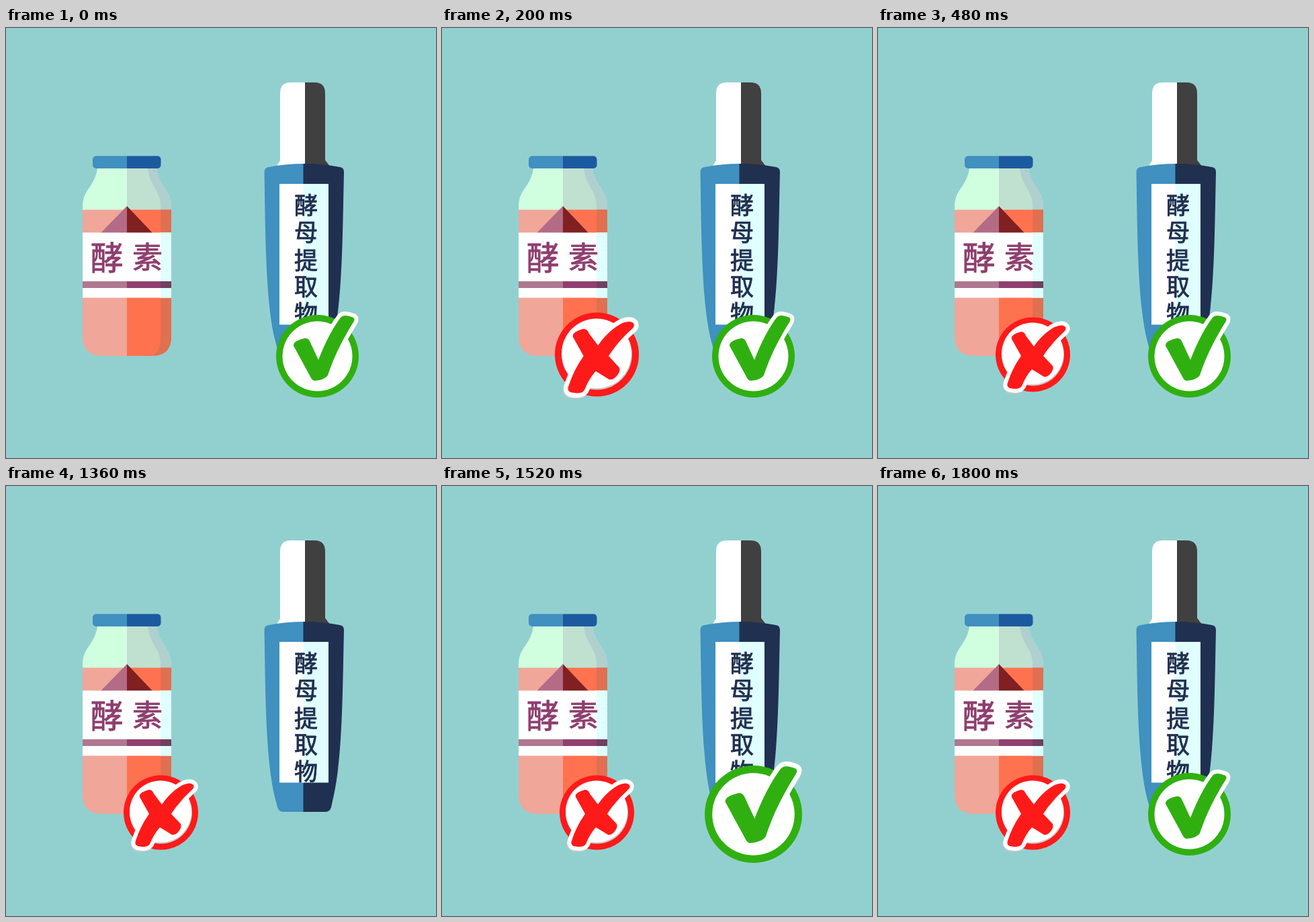
An HTML page for the animation above (2.8 s loop, 640 by 640 pixels).

```html
<!DOCTYPE html>
<html lang="zh">
<head>
<meta charset="utf-8">
<style>
  html, body { margin: 0; width: 100%; height: 100%; overflow: hidden; background: #92d0d0; }
  svg { display: block; width: 100%; height: 100%; }
  text { font: 500 35px "Noto Sans CJK SC", "Noto Sans CJK", sans-serif; text-anchor: middle; stroke-width: 0.9; }
  .outline { fill: #fff; stroke: #fff; stroke-width: 12; stroke-linejoin: round; }
</style>
</head>
<body>
<svg viewBox="0 0 640 640">
  <defs>
    <clipPath id="jar">
      <path d="M136 209C132 237 114 240 114 266V459Q114 488 143 488H217Q246 488 246 459V266C246 240 228 237 224 209Z"/>
    </clipPath>
    <clipPath id="lid"><rect x="129" y="190.500" width="101.500" height="18.500" rx="5"/></clipPath>
    <clipPath id="cap"><path d="M408 97Q408 81 424 81H459Q475 81 475 97V206H408Z"/></clipPath>
    <clipPath id="flask">
      <path d="M384.500 214Q384.500 208 391 207Q443 197 497 207Q503 208 503 214C501 300 501 395 489 455L484 478Q482 485 476 485H412Q406 485 404 478L400 463C386 405 386 300 384.500 214Z"/>
    </clipPath>
    <path id="tick" d="M428 473Q427 466 444 462Q449 461 452 466L465 494Q480 455 498 431Q503 425 517 431Q520 433 517 438Q491 479 479 517Q474 524 459 525Q455 524 453 519Z"/>
    <path id="ex" d="M199 463Q197 456 213 452Q218 452 220 458L232 474Q245 455 263 445Q275 440 279 445Q281 449 276 453Q259 468 246 488L260 503Q262 508 257 514Q252 520 247 519L229 508Q220 518 214 533Q210 539 196 536Q191 534 193 528Q200 506 213 488Z"/>
  </defs>

  <!-- juice jar -->
  <g clip-path="url(#jar)">
    <path fill="#d0ffe0" d="M114 209h66v62h-66z"/>
    <path fill="#c0e0d0" d="M180 209h66v62h-66z"/>
    <path fill="#b0d0d0" d="M211 209C214 237 230 240 230 266V271H246V209Z"/>
    <path fill="#f0a698" d="M114 270.500h66v218h-66z"/>
    <path fill="#ff7250" d="M180 270.500h66v218h-66z"/>
    <path fill="#e07050" d="M230 270.500V459Q230 480 219 488H246V270.500Z"/>
    <path fill="#b46b86" d="M180 265V305H141Z"/>
    <path fill="#802020" d="M180 265V305H218Z"/>
    <path fill="#fff" d="M114 304.500h132v97h-132z"/>
    <path fill="#e0ffff" d="M230 304.500h16v97h-16z"/>
    <path fill="#b07890" d="M114 377h66v10h-66z"/>
    <path fill="#904070" d="M180 377h50v10h-50z"/>
    <path fill="#704060" d="M230 377h16v10h-16z"/>
  </g>
  <g clip-path="url(#lid)">
    <path fill="#4090c0" d="M129 190h51v19h-51z"/>
    <path fill="#1c5a9f" d="M180 190h51v19h-51z"/>
  </g>
  <g fill="#8e3e6e" stroke="#8e3e6e">
    <text x="150" y="360" style="font-size:49px">酵</text>
    <text x="210.500" y="358" style="font-size:45px">素</text>
  </g>

  <!-- serum bottle -->
  <path fill="#fff" d="M410 194L402 207H445V194Z"/>
  <path fill="#404040" d="M473 194L483 207H445V194Z"/>
  <g clip-path="url(#cap)">
    <path fill="#fff" d="M408 81h37v125h-37z"/>
    <path fill="#404040" d="M445 81h30v125h-30z"/>
  </g>
  <g clip-path="url(#flask)">
    <path fill="#4090c0" d="M384 200h59v286h-59z"/>
    <path fill="#203050" d="M442.500 200h61v286h-61z"/>
  </g>
  <path fill="#fff" d="M407 232h36v209.500h-36z"/>
  <path fill="#e0ffff" d="M442.500 232h37.500v209.500h-37.500z"/>
  <g fill="#203050" stroke="#203050">
    <text x="446.500" y="277">酵</text>
    <text x="446.500" y="317">母</text>
    <text x="446.500" y="359">提</text>
    <text x="446.500" y="398">取</text>
    <text x="446.500" y="438">物</text>
  </g>

  <g id="cross">
    <use href="#ex" x="-1" y="2" fill="#c8c8c8" stroke="#c8c8c8" stroke-width="11" stroke-linejoin="round"/>
    <circle cx="230.500" cy="486" r="55.500" fill="#ff1a1a"/>
    <circle cx="230.500" cy="486" r="46.500" fill="#c8c8c8"/>
    <circle cx="230" cy="484.500" r="46" fill="#fff"/>
    <use href="#ex" class="outline"/>
    <use href="#ex" fill="#ff1a1a"/>
  </g>
  <g id="check">
    <circle cx="463.500" cy="488.500" r="61.500" fill="#30b010"/>
    <circle cx="463.500" cy="488.500" r="52" fill="#fff"/>
    <use href="#tick" class="outline"/>
    <use href="#tick" fill="#30b010"/>
  </g>
</svg>
<script>
  const LOOP = 2800, STEP = 40;
  const cross = document.getElementById('cross');
  const check = document.getElementById('check');

  // Stamp: lands large, shrinks fast, then settles slowly.
  function stamp(t, duration) {
    if (t < 0) return 0;
    if (t >= duration) return 1;
    return 1 + 0.34 * Math.exp(-t / 49) + 0.14 * (1 - t / 400);
  }

  function place(badge, x, y, scale) {
    badge.setAttribute('visibility', scale ? 'visible' : 'hidden');
    badge.setAttribute('transform', `translate(${x} ${y}) scale(${scale}) translate(${-x} ${-y})`);
  }

  function draw() {
    const t = Math.floor(performance.now() % LOOP / STEP) * STEP;
    place(cross, 230.5, 486, stamp(t - 80, 400));
    place(check, 463.5, 488.5, t < 1360 ? 1 : stamp(t - 1440, 360));
    requestAnimationFrame(draw);
  }
  draw();
</script>
</body>
</html>
```
